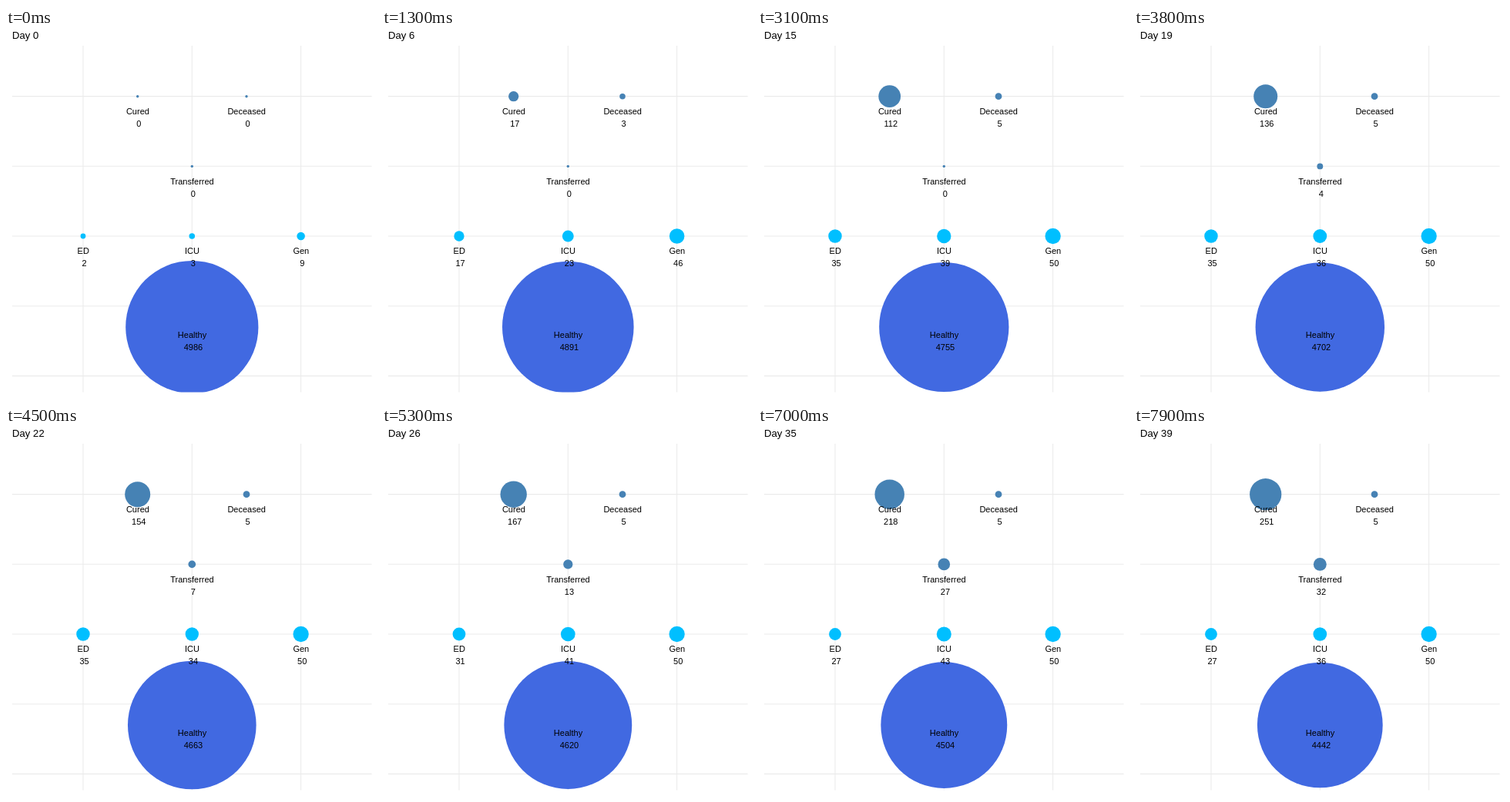
These frames come from a looping animation (480 by 480 pixels, 8000 ms). An HTML page:

```html
<!DOCTYPE html>
<html lang="en">
<head>
<meta charset="utf-8">
<title>Patient flow by day</title>
<style>
html, body { margin: 0; width: 100%; height: 100%; overflow: hidden; background: #fff; }
svg { display: block; width: 480px; height: 480px; }
text { font: 11px "Liberation Sans", Arial, sans-serif; text-anchor: middle; }
#day { font-size: 13.2px; text-anchor: start; }
</style>
</head>
<body>
<svg id="stage" viewBox="0 0 480 480">
  <clipPath id="panel"><rect x="8" y="23" width="466.5" height="449.6"/></clipPath>
  <path d="M8 88.6H474.5M8 179.3H474.5M8 270H474.5M8 360.7H474.5M8 451.4H474.5M100 23V472.6M241.3 23V472.6M382.6 23V472.6" stroke="#ebebeb" stroke-width="1.07"/>
  <g id="dots" clip-path="url(#panel)"></g>
  <g id="labels"></g>
  <text id="day" x="8" y="14"></text>
</svg>
<script>
const STEP = 100, STEPS = 80;
const stepKnots = [0, 13, 24, 31, 45, 62, 79];
const dayKnots = stepKnots.map(k => Math.floor(k / 2));

// name, x, y, label baseline, colour, counts at the knots
const groups = [
  ["Cured", 170.7, 88.7, 112, "#4682b4", [0, 17, 81, 112, 154, 184, 251]],
  ["Deceased", 312, 88.7, 112, "#4682b4", [0, 3, 3, 5, 5, 5, 5]],
  ["Transferred", 241.3, 179.4, 203, "#4682b4", [0, 0, 0, 0, 7, 21, 32]],
  ["ED", 100, 270, 293, "#00bfff", [2, 17, 33, 35, 35, 27, 27]],
  ["ICU", 241.3, 270, 293, "#00bfff", [3, 23, 29, 39, 34, 49, 36]],
  ["Gen", 382.6, 270, 293, "#00bfff", [9, 46, 37, 50, 50, 50, 50]],
  ["Healthy", 241.3, 388, 402, "#4169e1", [4986, 4891, 4813, 4755, 4663, 4566, 4442]]
];

const $ = id => document.getElementById(id);

function add(parent, tag, attrs, text = "") {
  const el = document.createElementNS("http://www.w3.org/2000/svg", tag);
  for (const key in attrs) el.setAttribute(key, attrs[key]);
  el.textContent = text;
  return parent.appendChild(el);
}

function interpolate(knots, values, at) {
  let i = 0;
  while (i < knots.length - 2 && at >= knots[i + 1]) i++;
  const part = (at - knots[i]) / (knots[i + 1] - knots[i]);
  return values[i] + (values[i + 1] - values[i]) * part;
}

// Area scale with a small minimum radius
const radius = n => 1.7 + 84.4 * Math.sqrt(n / 4986);

const nodes = groups.map(([name, x, y, base, fill, counts]) => {
  const dot = add($("dots"), "circle", { cx: x, cy: y, fill });
  add($("labels"), "text", { x: x + 0.2, y: base }, name);
  const count = add($("labels"), "text", { x: x + 1.6, y: base + 16 });
  return { dot, count, counts };
});

function draw(now) {
  const step = Math.floor(now / STEP) % STEPS;
  const day = Math.floor(step / 2);
  $("day").textContent = "Day " + day;
  for (const { dot, count, counts } of nodes) {
    dot.setAttribute("r", radius(interpolate(stepKnots, counts, step)));
    count.textContent = Math.round(interpolate(dayKnots, counts, day));
  }
}

let start;
function tick(now) {
  start ??= now;
  draw(now - start);
  requestAnimationFrame(tick);
}
draw(0);
requestAnimationFrame(tick);
</script>
</body>
</html>
```
